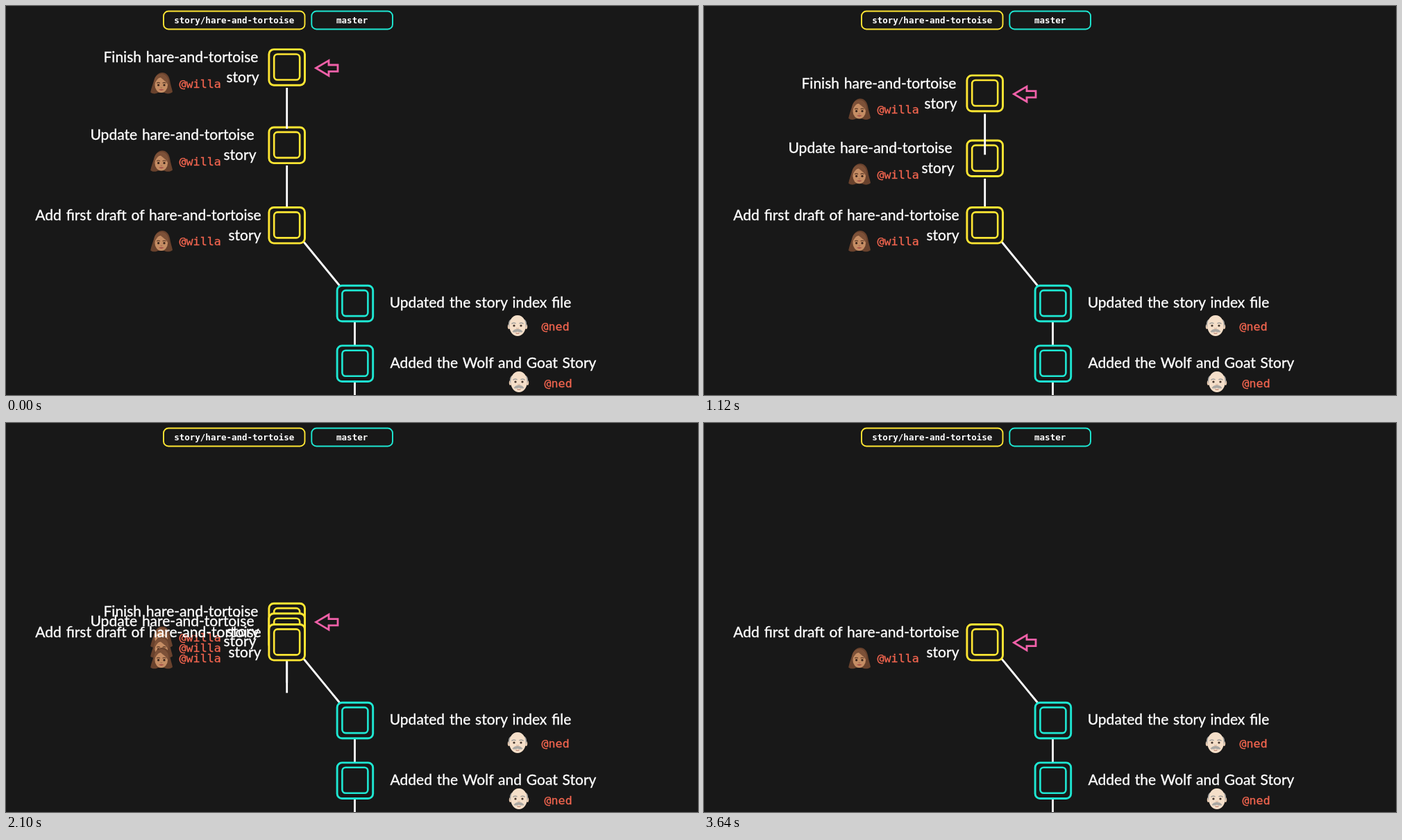
Write an HTML page that moves like this. It is 997 by 561 pixels and loops after 3920 ms.

```html
<!DOCTYPE html>
<html lang="en">
<head>
<meta charset="utf-8">
<title>Squashing commits</title>
<style>
  html, body { margin: 0; width: 100%; height: 100%; overflow: hidden; background: #181818; }
  svg { display: block; width: 997px; height: 561px; }
  .msg { font: 21px Lato, sans-serif; word-spacing: 1.5px; fill: #fff; stroke: #fff; stroke-width: .35px; text-anchor: middle; }
  .user { font: 16.7px "DejaVu Sans Mono", monospace; fill: #f2654f; stroke: #f2654f; stroke-width: .3px; }
  .tag { font: bold 12.5px "DejaVu Sans Mono", monospace; fill: #fff; text-anchor: middle; }
  .link { stroke: #fff; stroke-width: 2.8; }
</style>
</head>
<body>
<svg id="stage" viewBox="0 0 997 561" xmlns="http://www.w3.org/2000/svg">
  <defs>
    <g id="woman">
      <path fill="#69422d" d="M-15.8 13.500C-15 9-13 3-11-3C-9-11-4-15 1-15C7-15 10.500-11 12-4C13 3 15.500 9 16 13C13 16 7 16 4 14H-5C-8 16-13 16-15.800 13.500Z"/>
      <ellipse cx="-.3" cy="3" rx="9.3" ry="11" fill="#c58d64"/>
      <path fill="#7d5138" d="M-10.500 4C-9-3-5-6-2-9C1-5 7-3 9.800 4C12-6 7-13 0-13C-8-13-12-6-10.500 4Z"/>
      <path fill="none" stroke="#5a3826" stroke-width="1.2" stroke-linecap="round" d="M-6.500 0q2-1.300 4 0M2 0q2-1.300 4 0"/>
      <g fill="#38231a"><circle cx="-4.4" cy="3" r="1.6"/><circle cx="4" cy="3" r="1.6"/></g>
      <path fill="none" stroke="#a36b4b" d="M-1.500 6.500q1.300 1 2.600 0"/>
      <path fill="#a8524a" d="M-4 9.300q3.800-1 7.600 0q-3.800 3.600-7.600 0Z"/>
    </g>
    <g id="man">
      <g fill="#e9cbb0"><ellipse cx="-12.4" cy="1.5" rx="1.8" ry="3.4"/><ellipse cx="12.4" cy="1.5" rx="1.8" ry="3.4"/></g>
      <path fill="#a5a4a2" d="M-13 0C-13.500-5-12-8-10-9H10C12-8 13.500-5 13 0L11 4H-11Z"/>
      <path fill="#f5dfc9" d="M0-15C8-15 11.500-8 11.700 0C12 9 6 15 0 15S-12 9-11.700 0C-11.500-8-8-15 0-15Z"/>
      <path fill="none" stroke="#a5a29d" stroke-width="1.6" stroke-linecap="round" d="M-8-3q2.500-1.800 5-.4M3-3.400q2.500-1.400 5 .4"/>
      <g fill="#43342b"><circle cx="-5" cy="0" r="1.6"/><circle cx="5" cy="0" r="1.6"/></g>
      <path fill="none" stroke="#d3ab92" d="M-2 3.600q2 1.400 4 0"/>
      <path fill="#aaa7a2" d="M0 5C3 4.500 6 6 7.500 9C4 10 2 9.400 0 8.500C-2 9.400-4 10-7.500 9C-6 6-3 4.500 0 5Z"/>
      <path fill="none" stroke="#b77d6b" stroke-width="1.1" d="M-2.500 10.700q2.500 1 5 0"/>
    </g>
  </defs>
</svg>
<script>
const LOOP = 3920, TICK = 70;
const MOVE_AT = 528, MOVE_MS = 2100;
const YELLOW = '#ffe633', TEAL = '#1ee8d3', BG = '#181818';
const stage = document.getElementById('stage');

const text = (cls, x, y, str) => `<text class="${cls}" x="${x}" y="${y}">${str}</text>`;
const link = (x1, y1, x2, y2) => `<path class="link" d="M${x1} ${y1}L${x2} ${y2}"/>`;
const face = (kind, x, y) => `<use href="#${kind}" x="${x}" y="${y}"/>`;

const commit = (x, y, color) => `<g fill="${BG}" stroke="${color}">
  <rect x="${x + 1.4}" y="${y + 1.4}" width="51.6" height="51.6" rx="7" stroke-width="2.9"/>
  <rect x="${x + 8.7}" y="${y + 8.3}" width="37" height="37" rx="5" stroke-width="2.6"/></g>`;

const tag = (x, w, color, str) =>
  `<rect x="${x}" y="7.5" width="${w}" height="26" rx="7" fill="${BG}" stroke="${color}" stroke-width="1.9"/>` +
  text('tag', x + w / 2, 24.5, str);

// One commit of the feature branch, shifted down by dy
const branchRow = (id, dy, msg, msgX, tailX) => `<g id="${id}"><g transform="translate(0 ${dy})">
  ${face('woman', 224, 111)}${text('user', 249.5, 117.6, '@willa')}
  ${text('msg', msgX, 81, msg)}${text('msg', tailX, 110, 'story')}
  ${commit(377.5, 61.2, YELLOW)}</g></g>`;

const masterRow = (y, msg, msgX, faceX, faceY, userX, userY) =>
  commit(475.7, y, TEAL) + text('msg', msgX, y + 33, msg) +
  face('man', faceX, faceY) + text('user', userX, userY, '@ned');

const links = layer => [[118, 177], [230, 289.5]].map(([a, b], i) =>
  `<path class="link" id="${layer}${i}" data-a="${a}" data-b="${b}"/>`).join('');

stage.insertAdjacentHTML('beforeend',
  tag(227, 203.5, YELLOW, 'story/hare-and-tortoise') +
  tag(440.3, 116.7, TEAL, 'master') +
  link(428, 339, 482, 405) + link(502.5, 455, 502.5, 489) + link(502.5, 542, 502.5, 561) +
  links('back') +
  branchRow('top', 0, 'Finish hare-and-tortoise', 252, 341) +
  branchRow('mid', 112.4, 'Update hare-and-tortoise', 239.5, 337) +
  branchRow('base', 227.9, 'Add first draft of hare-and-tortoise', 205, 344) +
  links('front') +
  masterRow(401.8, 'Updated the story index file', 683.5, 737, 461, 771.5, 468) +
  masterRow(488.5, 'Added the Wolf and Goat Story', 702, 739, 542, 775.5, 549.5) +
  `<path id="arrow" fill="none" stroke="#f060a8" stroke-width="2.8"
     d="M446.500 89.500L465 78.600V85H478V94.300H465V100.500Z"/>`);

const el = id => document.getElementById(id);
const clamp = v => Math.min(1, Math.max(0, v));

// cubic-bezier(.42, 0, .58, 1)
function easeInOut(x) {
  let lo = 0, hi = 1;
  for (let i = 0; i < 24; i++) {
    const p = (lo + hi) / 2, q = 1 - p;
    if (3 * q * q * p * .42 + 3 * q * p * p * .58 + p ** 3 < x) lo = p; else hi = p;
  }
  return lo * lo * (3 - 2 * lo);
}

// drop: travel in px; under: when the link slips behind the next commit
const movers = [
  { id: 'top', drop: 227.3, under: 1610 },
  { id: 'mid', drop: 114.8, under: 1120 }
];

function draw(t) {
  const k = easeInOut(clamp((t - MOVE_AT) / MOVE_MS));
  const fade = 1 - clamp((t - 2660) / 980);
  const left = 1 - clamp((t - 2520) / 154);
  movers.forEach(({ id, drop, under }, i) => {
    const shift = `translate(0 ${drop * k})`;
    el(id).setAttribute('transform', shift);
    el(id).setAttribute('opacity', fade);
    for (const layer of ['back', 'front']) {
      const line = el(layer + i), a = +line.dataset.a, b = +line.dataset.b;
      const shown = left > 0 && (layer === 'back') === (t >= under);
      line.setAttribute('d', `M404.7 ${a}V${a + (b - a) * left}`);
      line.setAttribute('transform', shift);
      line.setAttribute('visibility', shown ? 'visible' : 'hidden');
    }
  });
  el('arrow').setAttribute('transform', `translate(0 ${movers[0].drop * k})`);
}

const start = performance.now();
function frame() {
  const t = (performance.now() - start) % LOOP;
  draw(Math.floor(t / TICK) * TICK);
  requestAnimationFrame(frame);
}
frame();
</script>
</body>
</html>
```
